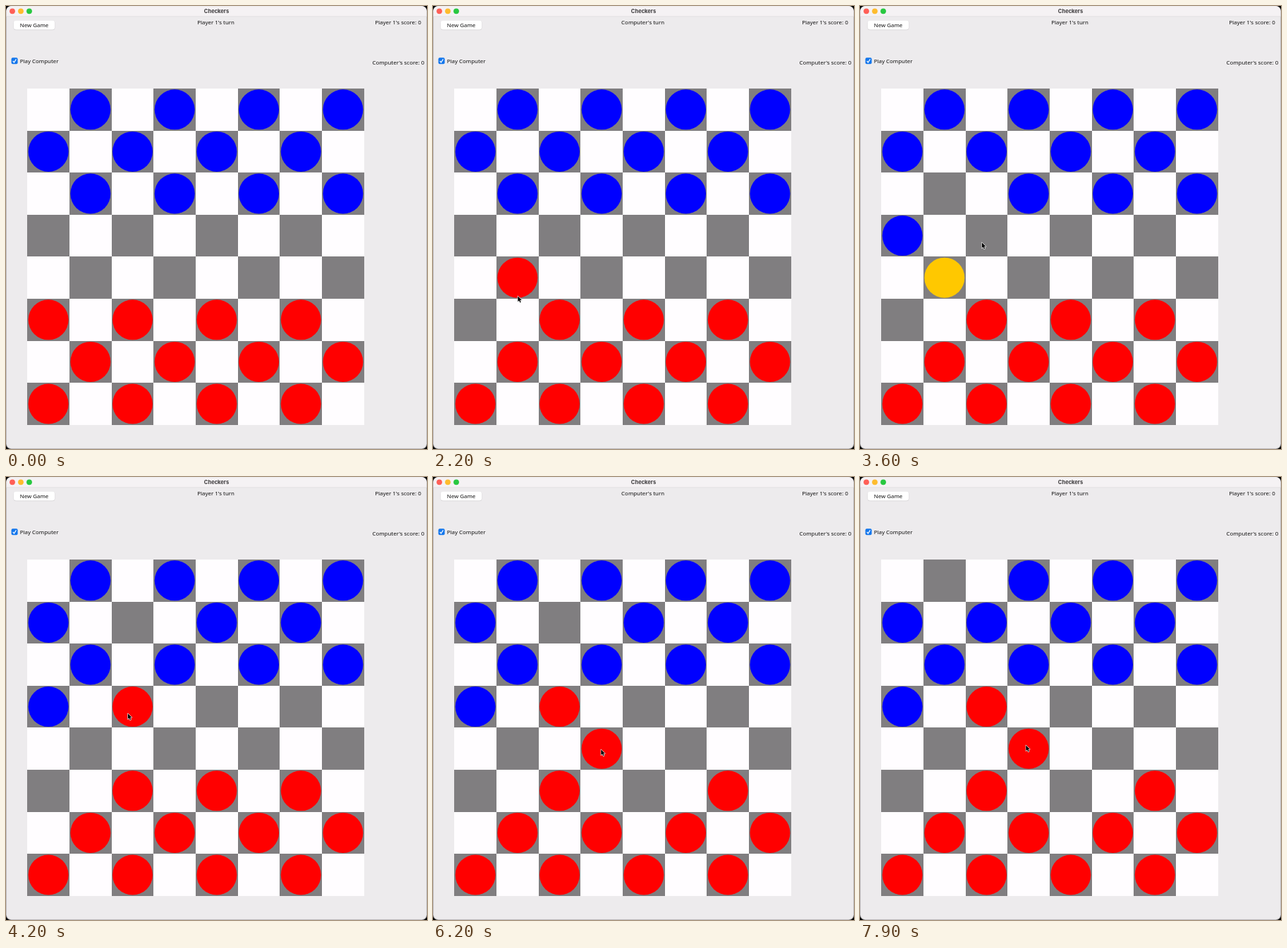
Recreate the animation shown at these times as an HTML page with a canvas. Size 597 by 628 pixels, loop 8 s.

```html
<!DOCTYPE html>
<html lang="en">
<head>
<meta charset="utf-8">
<title>Checkers</title>
<style>
  html, body { margin: 0; width: 100%; height: 100%; overflow: hidden; background: #000; }
  canvas { display: block; }
</style>
</head>
<body>
<canvas id="stage" width="597" height="628"></canvas>
<script>
const ctx = document.getElementById('stage').getContext('2d');
const LOOP = 8000, TICK = 100;
const BOARD = { x: 30.3, y: 117, w: 59.68, h: 59.6 };
const RED = '#ff0000', BLUE = '#0000ff', ORANGE = '#ffc800';
const UI_FONT = '500 7.9px "Noto Sans", sans-serif';

// Squares are [column, row].
const moves = [
  { picked: 1500, at: 2200, from: [0, 5], to: [1, 4] },
  { at: 2400, from: [1, 2], to: [0, 3] },
  { picked: 2900, at: 3700, from: [1, 4], to: [2, 3] },
  { at: 4000, from: [2, 1], to: [1, 2] },
  { picked: 5700, at: 6200, from: [4, 5], to: [3, 4] },
  { at: 6700, from: [1, 0], to: [2, 1] }
];

// Pointer stops: time, x, y.
const pointer = [
  [1200, 85, 463], [1500, 83, 457], [1700, 83, 457], [2200, 120, 411],
  [2900, 120, 411], [3500, 172.5, 335], [5100, 172.5, 335], [5300, 282, 436],
  [5700, 282, 436], [6100, 238, 386], [7800, 238, 386], [7900, 235, 380]
];

const isDark = (col, row) => (col + row) % 2 === 1;
const key = square => square.join();

function position(time) {
  const pieces = new Map();
  for (let row = 0; row < 8; row++) {
    for (let col = 0; col < 8; col++) {
      if (isDark(col, row) && (row < 3 || row > 4)) {
        pieces.set(key([col, row]), row < 3 ? BLUE : RED);
      }
    }
  }
  let computerTurn = false;
  for (const { picked, at, from, to } of moves) {
    if (time >= at) {
      pieces.set(key(to), pieces.get(key(from)));
      pieces.delete(key(from));
      computerTurn = Boolean(picked);
    } else if (picked && time >= picked) {
      pieces.set(key(from), ORANGE);
    }
  }
  return { pieces, computerTurn };
}

function pointerAt(time) {
  if (time < pointer[0][0]) return null;
  const next = pointer.findIndex(stop => stop[0] > time);
  if (next < 0) return pointer[pointer.length - 1].slice(1);
  const [t0, x0, y0] = pointer[next - 1], [t1, x1, y1] = pointer[next];
  const p = (time - t0) / (t1 - t0), eased = p * p * (3 - 2 * p);
  return [x0 + (x1 - x0) * eased, y0 + (y1 - y0) * eased];
}

function box(x, y, w, h, r, color) {
  ctx.fillStyle = color;
  ctx.beginPath();
  ctx.roundRect(x, y, w, h, r);
  ctx.fill();
}

function disc(x, y, r, color) {
  ctx.fillStyle = color;
  ctx.beginPath();
  ctx.arc(x, y, r, 0, Math.PI * 2);
  ctx.fill();
}

function label(text, x, y, align = 'center', font = UI_FONT, color = '#111') {
  ctx.font = font;
  ctx.textAlign = align;
  ctx.fillStyle = color;
  ctx.fillText(text, x, y);
}

function drawWindow(computerTurn) {
  ctx.fillStyle = '#000';
  ctx.fillRect(0, 0, 597, 628);
  box(0, 0, 597, 628, 7, '#a9a7a9');
  box(0.7, 0.3, 595.6, 627, 7, '#edebed');
  box(0.7, 0.3, 595.6, 14.7, [7, 7, 0, 0], '#f5f2f4');
  ctx.fillStyle = '#dedcde';
  ctx.fillRect(1, 14.5, 595, 0.8);

  ['#ff5f57', '#febc2e', '#28c840'].forEach((color, i) => disc(9 + 12 * i, 7.3, 3.9, color));
  label('Checkers', 298.5, 9.9, 'center', '700 7.6px Inter, sans-serif', '#3c3a3c');

  box(10.7, 20.6, 58.6, 13.6, 3.5, '#d2d0d2');
  box(11, 20.5, 58, 13, 3.2, '#fff');
  label('New Game', 40, 29.7);

  box(7.6, 73.2, 9, 9, 2, '#1477ec');
  ctx.strokeStyle = '#fff';
  ctx.lineWidth = 1.2;
  ctx.beginPath();
  ctx.moveTo(9.8, 78);
  ctx.lineTo(11.5, 80);
  ctx.lineTo(14.4, 75.4);
  ctx.stroke();
  label('Play Computer', 19.8, 80.7, 'left');

  label(computerTurn ? "Computer's turn" : "Player 1's turn", 297.6, 26.4);
  label("Player 1's score: 0", 556, 26.4);
  label("Computer's score: 0", 556.3, 82.6);
}

function drawBoard(pieces) {
  const { x, y, w, h } = BOARD;
  const edgeX = col => Math.round(x + col * w), edgeY = row => Math.round(y + row * h);
  for (let row = 0; row < 8; row++) {
    for (let col = 0; col < 8; col++) {
      const left = edgeX(col), top = edgeY(row);
      ctx.fillStyle = isDark(col, row) ? '#807e80' : '#fffdff';
      ctx.fillRect(left, top, edgeX(col + 1) - left, edgeY(row + 1) - top);
      const color = pieces.get(key([col, row]));
      if (color) disc(x + (col + 0.5) * w, y + (row + 0.5) * h, 28.5, color);
    }
  }
}

function drawPointer([x, y]) {
  ctx.save();
  ctx.translate(x, y);
  ctx.beginPath();
  [[0.3, 0.3], [0.3, 8.2], [2.1, 6.6], [3.4, 9.6], [4.7, 9], [3.5, 6.1], [5.9, 6]]
    .forEach(point => ctx.lineTo(...point));
  ctx.closePath();
  ctx.strokeStyle = '#fff';
  ctx.lineWidth = 1.2;
  ctx.lineJoin = 'round';
  ctx.stroke();
  ctx.fillStyle = '#000';
  ctx.fill();
  ctx.restore();
}

const start = performance.now();

function render(now) {
  const elapsed = Math.max(0, now - start) % LOOP;
  const time = Math.floor(elapsed / TICK) * TICK;
  const { pieces, computerTurn } = position(time);
  drawWindow(computerTurn);
  drawBoard(pieces);
  const tip = pointerAt(time);
  if (tip) drawPointer(tip);
  requestAnimationFrame(render);
}

render(start);
</script>
</body>
</html>
```
